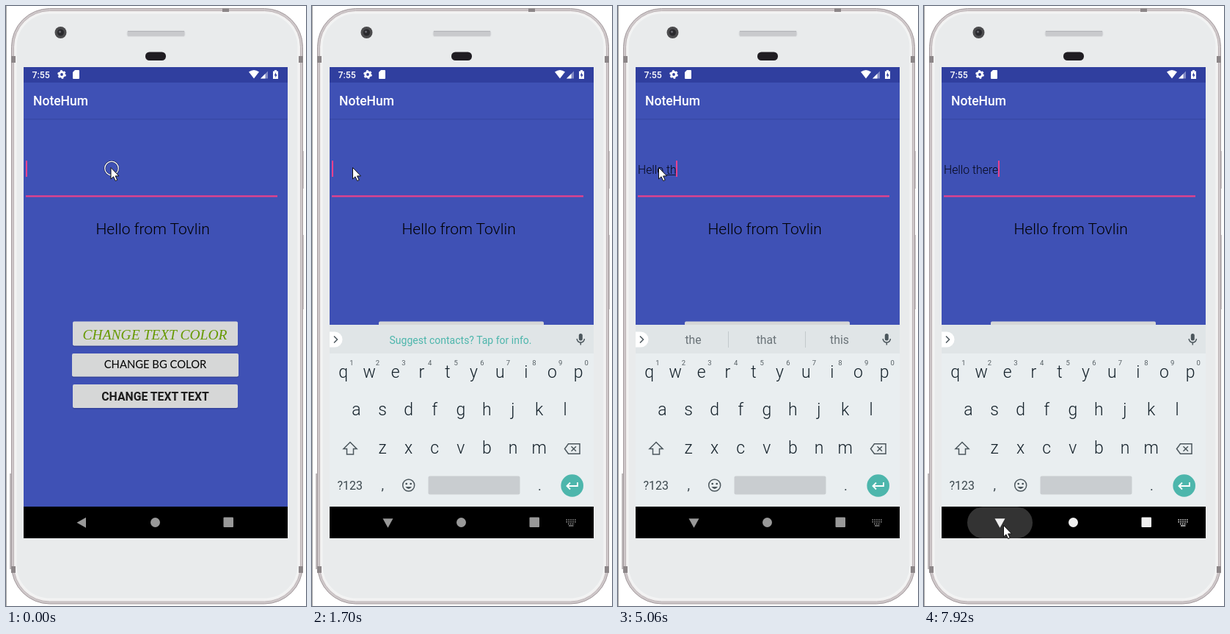
An HTML page that plays this animation: 409 px wide and 815 px high, repeating every 8000 ms.

```html
<!DOCTYPE html>
<html lang="en">
<head>
<meta charset="utf-8">
<title>Phone typing demo</title>
<style>
  html, body { margin: 0; width: 100%; height: 100%; overflow: hidden; background: #fff; }
  svg { display: block; width: 409px; height: 815px; font-family: Roboto, sans-serif; }
  .mid { text-anchor: middle; }
  .line { fill: none; stroke: #4c575d; stroke-width: 1.5; }
  .thin { font-weight: 350; }
  #keys { font-size: 23px; fill: #14212a; }
  #hints { font-size: 9.5px; fill: #565f64; }
  #words { font-size: 15.75px; fill: #6a7378; }
  #typed { font-size: 15.75px; fill: #060818; white-space: pre; }
</style>
</head>
<body>
<svg viewBox="0 0 409 815">
  <!-- phone body -->
  <path d="M.5 0V815" stroke="#aaa"/>
  <path d="M404 197V248M404 311V412" stroke="#8f888a" stroke-width="3"/>
  <path d="M6 635V765" stroke="#a9a2a4" stroke-width="1.5"/>
  <rect x="7.5" y="3.5" width="397" height="808.5" rx="52" fill="#cfc8ca" stroke="#a39a9d"/>
  <rect x="10.5" y="6.5" width="391" height="802.5" rx="49" fill="#f1efef" stroke="#bdb5b7"/>
  <rect x="13.5" y="9.5" width="385" height="796" rx="46" fill="#e9ebec" stroke="#f3f4f4" stroke-width="2"/>
  <path d="M7 68H13V77H7ZM399 68H405V77H399ZM7 761H13V770H7ZM399 761H405V770H399ZM295 3H304V8H295Z" fill="#8c8688"/>
  <circle cx="74.500" cy="36" r="8" fill="#4b4b4d"/>
  <circle cx="74.500" cy="36" r="4.5" fill="#29292d"/>
  <circle cx="73.500" cy="35" r="1.6" fill="#66666e"/>
  <rect x="165" y="33.5" width="79" height="8" rx="2.5" fill="#c9cacd" stroke="#dddfe1"/>
  <path d="M166 34.5H243" stroke="#b3b4b8"/>
  <rect x="190" y="62.5" width="28" height="11.5" rx="5.5" fill="#201d22"/>

  <!-- app screen -->
  <path d="M24 83H384V723H24Z" fill="#3f51b5"/>
  <path d="M24 83H384V104H24Z" fill="#303f9f"/>
  <path d="M24 153.5H384" stroke="#384aa6"/>
  <path d="M24 154.5H384" stroke="#3c4dae"/>
  <g fill="#fff">
    <text x="35.5" y="98" font-size="12.3" font-weight="500">7:55</text>
    <circle cx="76" cy="93" r="3.3" fill="none" stroke="#fff" stroke-width="2.8"/>
    <circle cx="76" cy="93" r="5" fill="none" stroke="#fff" stroke-width="1.8" stroke-dasharray="2.6 2.636"/>
    <path d="M94 87H99Q100 87 100 88V98Q100 99 99 99H92Q91 99 91 98V90Z"/>
    <path d="M331 89.5Q338 84.5 345 89.5L338 98.5Z"/>
    <path d="M347 98.5L357 88.5V98.5Z" opacity=".4"/>
    <path d="M347 98.5L353.5 92V98.5Z"/>
    <path d="M366 87H369V88.5H371V99H364V88.5H366Z"/>
    <path d="M368 90L365.7 94.5H367.3V97.5L369.6 93H368Z" fill="#303f9f"/>
    <text x="37" y="135" font-size="17.5" font-weight="500">NoteHum</text>
  </g>
  <path d="M27 258.4H370" stroke="#e9418b" stroke-width="2.4"/>
  <text id="typed" class="thin" x="27" y="227.5"></text>
  <path id="under" stroke="#10142d"/>
  <path id="caret" d="M1 210V232" stroke="#e8418d" stroke-width="2"/>
  <text class="thin" x="122.5" y="309.5" font-size="21">Hello from Tovlin</text>
  <g fill="#33429a">
    <rect x="91" y="430" width="225" height="33" rx="2"/>
    <rect x="90" y="473" width="227" height="32" rx="2"/>
    <rect x="91" y="515" width="225" height="32.5" rx="2"/>
  </g>
  <g fill="#d6d7d7">
    <rect x="91" y="428.5" width="225" height="33" rx="2"/>
    <rect x="90" y="472" width="227" height="31.5" rx="2"/>
    <rect x="91" y="514" width="225" height="32" rx="2"/>
  </g>
  <g class="mid">
    <text x="203" y="453" font-family="Liberation Serif, serif" font-style="italic" font-size="19.5" fill="#669900">CHANGE TEXT COLOR</text>
    <text x="203.5" y="492" font-family="Lato, sans-serif" font-size="14.8">CHANGE BG COLOR</text>
    <text x="203.5" y="536" font-size="15.8" font-weight="700" fill="#1c1c1c">CHANGE TEXT TEXT</text>
  </g>
  <path d="M24 680H384V723H24Z"/>

  <!-- keyboard -->
  <g id="board">
    <path d="M24 433H384V680H24Z" fill="#e9eef0"/>
    <path d="M24 433H384V472H24Z" fill="#e0e5e7"/>
    <path d="M24 442.5H31A10.5 10.5 0 0 1 31 463.5H24Z" fill="#fff"/>
    <path d="M30 448.5L34.5 453L30 457.5" class="line"/>
    <rect x="363.8" y="445" width="5" height="9.5" rx="2.5" fill="#4c575d"/>
    <path d="M361.2 452A5.1 5.1 0 0 0 371.4 452M366.3 457V460.5" class="line"/>
    <text id="ask" class="mid" x="202.5" y="458.5" font-size="14" fill="#4db6ac">Suggest contacts? Tap for info.</text>
    <g id="words" class="mid">
      <text x="102.5" y="459"></text><text x="202.5" y="459"></text><text x="302" y="459"></text>
    </g>
    <path id="bars" d="M150.5 442V464M255.5 442V464" stroke="#c3c9cc"/>
    <g id="keys" class="mid thin"></g>
    <g id="hints" class="mid"></g>
    <path d="M52 592.5L61 601.5H56.5V609H47.5V601.5H43Z" class="line"/>
    <path d="M349.5 594.8H365V608.3H349.5L344.5 601.5ZM353.5 598.3L360 604.8M360 598.3L353.5 604.8" class="line"/>
    <g fill="#3c484e" font-size="16">
      <text x="34.5" y="657">?123</text>
      <text x="94.5" y="657" font-size="18">,</text>
      <text x="308" y="658" font-size="18">.</text>
      <circle cx="128.7" cy="649" r="1.3"/><circle cx="134.7" cy="649" r="1.3"/>
    </g>
    <circle cx="131.7" cy="651" r="8" class="line"/>
    <path d="M127.5 653Q131.7 659 136 653Z" fill="#4c575d"/>
    <rect x="158.5" y="638.5" width="125" height="25" rx="2" fill="#c9cdd0"/>
    <circle cx="354.7" cy="651.5" r="15.3" fill="#4db6ac"/>
    <path d="M362 647V652H348M352 647.5L347.5 652L352 656.5" fill="none" stroke="#fff" stroke-width="1.8"/>
  </g>

  <!-- navigation bar -->
  <rect id="ripple" y="680.5" height="42.5" rx="21" fill="#333"/>
  <g id="nav">
    <path id="back" d="M-7 0L5.5 -7V7Z"/>
    <circle cx="203.5" cy="701.5" r="6.5"/>
    <rect x="296.5" y="694.5" width="13.5" height="13.5" rx="1"/>
    <g id="switch">
      <path d="M346.5 698H360M346.5 700.8H360M349 703.5H358" stroke-width="1.5" stroke-dasharray="1.5 1.4"/>
      <path d="M350 706H356.5" stroke-width="1.3"/>
    </g>
  </g>

  <g id="ring" fill="none">
    <circle cx="144" cy="220.5" r="9.3" stroke="#1d2555" stroke-width="2.6"/>
    <circle cx="144" cy="220.5" r="9.3" stroke="#fff" stroke-width="1.3"/>
  </g>
  <path id="mouse" d="M.5 .5V16L4 12.8L6.7 18.5L9.2 17.4L6.6 11.9H11.5Z" fill="#fff" stroke="#111"/>
</svg>
<script>
const $ = id => document.getElementById(id);
const LOOP = 8000;

// Each list holds [start time, value...]; the latest started entry applies.
const at = (list, t) => list.findLast(e => e[0] <= t);
const show = (id, on) => $(id).style.display = on ? '' : 'none';

// number of typed characters
const typed = [[0, 0], [3120, 1], [3500, 2], [3650, 3], [3930, 4], [4080, 5], [4360, 6],
  [4640, 7], [5060, 8], [5190, 9], [5460, 10], [5610, 11]];
const words = [[0, ''], [3650, 'He,Her,Hello'], [3930, "Hell,Hello,Hell's"],
  [4080, 'Hello,Hello I,Hello there'], [4360, 'there,I,my'], [4760, 't,the,to'],
  [5060, 'the,that,this'], [5190, 'the,then,these'], [5460, 'the,there,these'],
  [5610, "there,there I,there I'm"], [7770, '']];
const blinks = [280, 1700, 2260, 2690, 6160, 6670, 7100, 7620];
const mouse = [[0, 142.5, 219], [870, 100, 219], [990, 60, 219], [1700, 55, 219],
  [5610, 55, 221], [6040, 3, 262], [6160, 34, 318], [6310, 46, 430], [6430, 66, 530],
  [6550, 85, 604], [6670, 102, 651], [6820, 108, 672], [6950, 113, 690],
  [7100, 113, 705], [7250, 107, 705], [7370, 100, 703], [7500, 104, 704], [7620, 108, 705]];
// keyboard drop, keyboard opacity, back arrow turn, icon colour
const board = [[0, 0, 0, 0, '#999'], [1420, 0, 0, -45, '#bbb'], [1540, 37, .62, -90, '#e6e6e6'],
  [1700, 0, 1, -90, '#999'], [7920, 0, 1, -90, '#f0f0f0']];
const ripple = [[0, 0, 0], [7770, 68, 72], [7920, 59, 89]];

const label = (x, y, s) => `<text x="${x}" y="${y}">${s}</text>`;
const row = (s, x, y) => [...s].map((c, i) => label(x + i * 35.6, y, c)).join('');
$('keys').innerHTML = row('qwertyuiop', 42.6, 505) + row('asdfghjkl', 60.4, 556) + row('zxcvbnm', 96, 608);
$('hints').innerHTML = row('1234567890', 53.8, 488);

function draw(t) {
  const text = $('typed'), n = at(typed, t)[1];
  text.textContent = 'Hello there'.slice(0, n);
  const end = 27 + (n && text.getSubStringLength(0, n));
  const start = n > 6 ? 27 + text.getSubStringLength(0, 6) : 27;
  $('under').setAttribute('d', `M${start} 229.5H${end}`);
  show('under', n && n != 6 && t < 7920);
  $('caret').setAttribute('transform', `translate(${Math.floor(end)})`);
  show('caret', blinks.filter(b => b <= t).length % 2 == 0);

  const list = at(words, t)[1].split(',');
  [...$('words').children].forEach((e, i) => e.textContent = list[i] || '');
  show('ask', t < 3650);
  show('bars', list.length > 1);

  const [, drop, alpha, turn, color] = at(board, t);
  $('board').setAttribute('transform', `translate(0 ${drop})`);
  $('board').setAttribute('opacity', alpha);
  $('back').setAttribute('transform', `translate(103.5 701.8) rotate(${turn})`);
  $('nav').setAttribute('fill', color);
  $('switch').setAttribute('stroke', color);
  show('switch', t >= 1540);

  const [, left, width] = at(ripple, t);
  $('ripple').setAttribute('x', left);
  $('ripple').setAttribute('width', width);
  const [, x, y] = at(mouse, t);
  $('mouse').setAttribute('transform', `translate(${x} ${y})`);
  show('ring', t < 150);
}

const begin = performance.now();
function tick() {
  draw((performance.now() - begin) % LOOP);
  requestAnimationFrame(tick);
}
tick();
</script>
</body>
</html>
```
